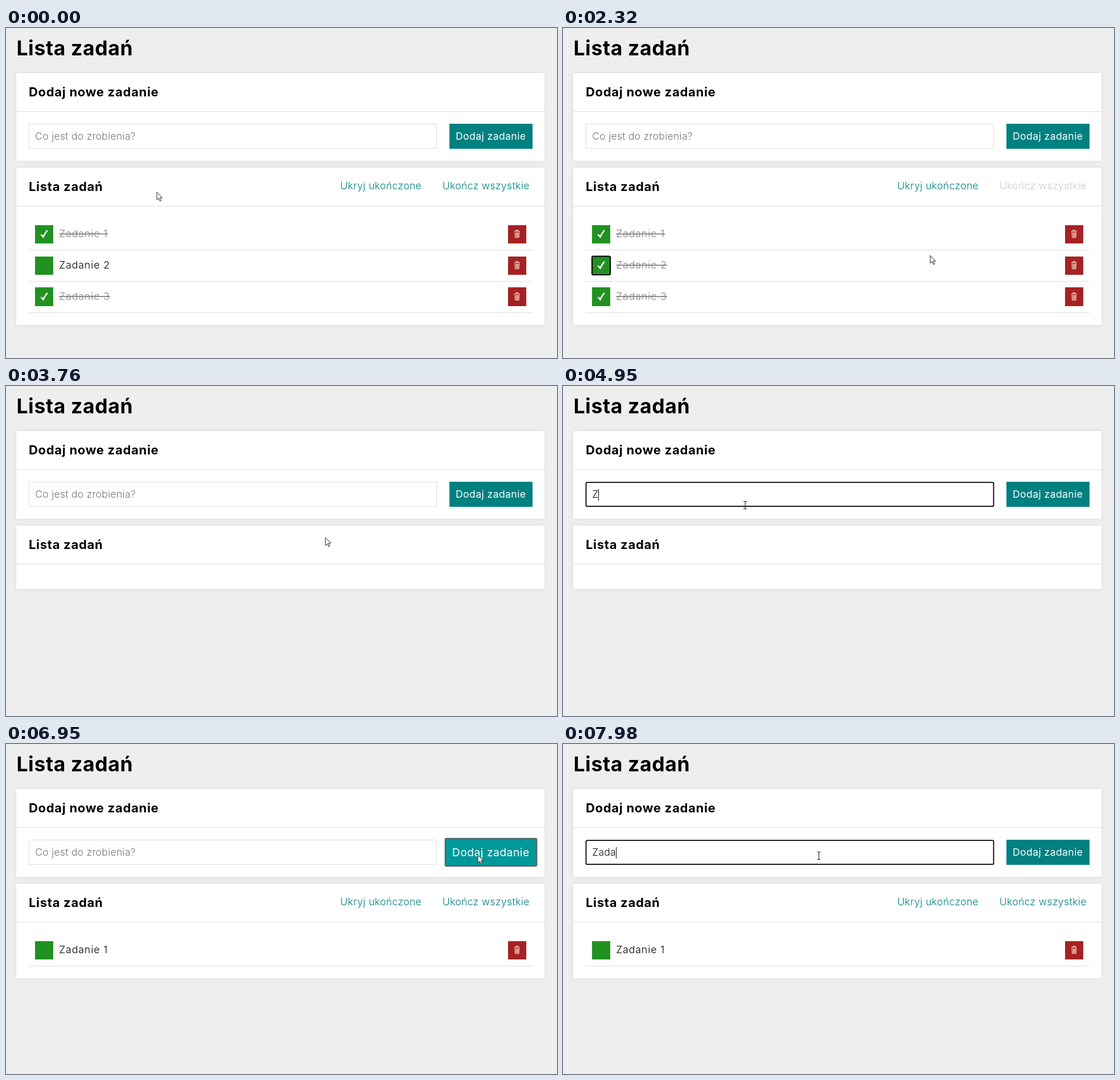
An HTML page for the animation above (8 s loop, 968 px wide and 579 px high).

```html
<!DOCTYPE html>
<html lang="pl">
<head>
<meta charset="utf-8">
<title>Lista zadań</title>
<style>
html, body { margin: 0; width: 100%; height: 100%; overflow: hidden; background: #eee; }
svg { display: block; font-family: Inter, "Open Sans", sans-serif; font-weight: 340; }
text { white-space: pre; }
.h1 { font-size: 35.5px; font-weight: 700; letter-spacing: .65px; }
.h2 { font-size: 22px; font-weight: 700; letter-spacing: .72px; }
.field { font-size: 17.4px; letter-spacing: .33px; }
.button { font-size: 17.5px; font-weight: 400; letter-spacing: .45px; fill: #fff; }
.link { font-size: 17.5px; letter-spacing: .4px; }
.task { font-size: 17.7px; letter-spacing: .9px; }
.card { fill: #fff; filter: drop-shadow(0 0 2.5px #d8d8d8); }
.crisp { shape-rendering: crispEdges; }
.rule { stroke: #ddd; }
</style>
</head>
<body>
<svg id="stage" width="968" height="579" viewBox="0 0 968 579"></svg>
<script>
const LOOP = 8000, FADE = 300, BLINK = 510, ROW = 54.9;
const CHECK_AT = 1070, ADD_AT = 6840;
const REMOVE_AT = [3080, 3270, 3430];
const FOCUS_AT = [4140, 7200];
const KEYS = [
  [4950, ...Array.from({ length: 7 }, (_, i) => 5150 + 90 * i), 5870],
  [7570, 7780, 7880, 7980]
];
const TYPED = "Zadanie 1";

// time, x, y of the pointer
const PATH = [
  [360, 265, 288], [1040, 71, 421], [1620, 71, 421], [2430, 675, 398],
  [2820, 880, 338], [3040, 898, 351], [3450, 898, 351], [4010, 320, 205],
  [4139, 320, 205], [4140, 320, 209], [6350, 320, 209], [6697, 829, 187],
  [6800, 829, 195], [6960, 829, 195], [7160, 449.5, 196]
];

const stage = document.getElementById("stage");

function add(tag, attrs, parent = stage) {
  const node = document.createElementNS("http://www.w3.org/2000/svg", tag);
  set(node, attrs);
  parent.appendChild(node);
  return node;
}
function set(node, attrs) {
  for (const key in attrs) node.setAttribute(key, attrs[key]);
}
function label(x, y, cls, content, parent) {
  const node = add("text", { x, y, class: cls }, parent);
  node.textContent = content;
  return node;
}
function show(node, on) {
  node.style.display = on ? "" : "none";
}
const rule = (x1, x2, y, parent) => add("line", { x1, x2, y1: y, y2: y, class: "rule crisp" }, parent);
const clamp = u => Math.min(1, Math.max(0, u));
const smooth = u => u * u * (3 - 2 * u);
const mix = (a, b, u) => `rgb(${a.map((v, i) => Math.round(v + (b[i] - v) * u))})`;

// CSS "ease" curve
function ease(u) {
  if (u <= 0 || u >= 1) return clamp(u);
  let lo = 0, hi = 1, s = .5;
  for (let i = 0; i < 20; i++) {
    s = (lo + hi) / 2;
    const x = .75 * s * (1 - s) * (1 - s) + .75 * s * s * (1 - s) + s ** 3;
    if (x < u) lo = s; else hi = s;
  }
  return .3 * s * (1 - s) * (1 - s) + 3 * s * s * (1 - s) + s ** 3;
}
const fade = (t, start) => ease((t - start) / FADE);
const hover = (t, enter, leave) => t < leave ? fade(t, enter) : fade(leave, enter) * (1 - fade(t, leave));

add("rect", { width: 968, height: 579, fill: "#eee" });
label(18.4, 48, "h1", "Lista zadań");

add("rect", { x: 18, y: 79, width: 928, height: 154, class: "card" });
label(39.9, 120, "h2", "Dodaj nowe zadanie");
rule(18, 946, 146.5);
const field = add("rect", { x: 40.5, width: 716, fill: "#fff" });
const entry = label(51.3, 196, "field", "");
const caret = add("line", { y1: 181, y2: 201, stroke: "#000" });
const button = add("g", {});
const buttonBox = add("rect", { x: 779, y: 168, width: 146, height: 44 }, button);
label(790, 196, "button", "Dodaj zadanie", button);
const buttonRing = add("rect", {
  x: 779, y: 168, width: 146, height: 44, rx: 2, fill: "none", stroke: "#5a6060", "stroke-width": 1.9
}, button);

const listCard = add("rect", { x: 18, y: 245, width: 928, class: "card" });
label(39.9, 286, "h2", "Lista zadań");
rule(18, 946, 312.5);
const hideLink = label(587.3, 283.4, "link", "Ukryj ukończone");
const doneLink = label(766.7, 283.4, "link", "Ukończ wszystkie");
set(hideLink, { fill: "#008080" });

const rows = [0, 1, 2].map(i => {
  const g = add("g", { transform: `translate(0 ${i * ROW})` });
  const square = x => add("rect", { x, y: 345.6, width: 32.4, height: 32.4, class: "crisp" }, g);
  const box = square(50.7);
  const ring = add("rect", { x: 51, y: 345.6, width: 32, height: 32.4, rx: 2, fill: "none", stroke: "#000", "stroke-width": 2 }, g);
  const tick = add("path", { d: "M61.5 362.2L65.4 366.6Q68.5 360 72.7 355", fill: "none", stroke: "#fff", "stroke-width": 2.5 }, g);
  const name = label(93.2, 367, "task", "", g);
  const bin = square(881.7);
  add("path", {
    d: "M893 356.5h9.6M896 356v-1.4h3.6v1.4M894 357.5l.6 10.2h6.4l.6-10.2M896.4 358.5v8M898 358.5v8M899.6 358.5v8",
    fill: "none", stroke: "#fbeadb", "stroke-width": 1
  }, g);
  rule(40, 925, 389.5, g);
  return { g, box, ring, tick, name, bin };
});

const arrow = add("path", {
  d: "M0 0V13.6L3.2 10.7L5.4 15.8L7.6 14.9L5.4 9.9H9.6Z",
  fill: "#fff", stroke: "#222", "stroke-width": 1
});
const beam = add("path", {
  d: "M-3 -6.5H-1Q0 -6.5 0 -5.5Q0 -6.5 1 -6.5H3M0 -5.5V5.5M-3 6.5H-1Q0 6.5 0 5.5Q0 6.5 1 6.5H3",
  fill: "none", stroke: "#222", "stroke-width": 1.1
});

function tasksAt(t) {
  if (t >= ADD_AT) return [{ id: 1, done: false }];
  const removed = REMOVE_AT.filter(at => t >= at).length;
  return [1, 2, 3].slice(removed).map(id => ({ id, done: id !== 2 || t >= CHECK_AT }));
}

function pointerAt(t) {
  const i = PATH.findIndex(p => p[0] > t);
  if (i === 0) return PATH[0].slice(1);
  if (i < 0) return PATH[PATH.length - 1].slice(1);
  const [t0, x0, y0] = PATH[i - 1], [t1, x1, y1] = PATH[i];
  const u = smooth((t - t0) / (t1 - t0));
  return [x0 + (x1 - x0) * u, y0 + (y1 - y0) * u];
}

function drawRows(t, tasks) {
  const lastRemoval = REMOVE_AT.filter(at => t >= at).pop();
  const binHover = t < 3450 ? fade(t, lastRemoval || 2810) : 0;
  rows.forEach((row, i) => {
    const task = tasks[i];
    show(row.g, task);
    if (!task) return;
    const second = task.id === 2;
    const fresh = second ? fade(t, CHECK_AT) : 1;
    const lit = second && t < REMOVE_AT[0] ? hover(t, 870, 1740) : 0;
    row.name.textContent = "Zadanie " + task.id;
    row.name.style.textDecoration = task.done ? "line-through" : "none";
    set(row.name, { fill: task.done ? mix([0, 0, 0], [128, 128, 128], fresh) : "#000" });
    set(row.box, { fill: mix([33, 145, 33], [37, 166, 37], lit) });
    set(row.tick, { opacity: task.done ? fresh : 0 });
    set(row.bin, { fill: mix([165, 34, 36], [190, 42, 42], i === 0 ? binHover : 0) });
    show(row.ring, second && t >= CHECK_AT && t < REMOVE_AT[0]);
  });
}

function drawField(t) {
  const round = t >= FOCUS_AT[1] ? 1 : 0;
  const focused = t >= FOCUS_AT[round] && !(round === 0 && t >= ADD_AT);
  const pressed = focused ? KEYS[round].filter(at => t >= at) : [];
  const text = TYPED.slice(0, pressed.length);
  set(field, focused
    ? { y: 169.2, height: 42, rx: 2, stroke: "#000", "stroke-width": 1.8 }
    : { y: 168.5, height: 43, rx: 0, stroke: "#ddd", "stroke-width": 1 });
  entry.textContent = text || "Co jest do zrobienia?";
  set(entry, { fill: text ? "#111" : "#757575" });
  const since = t - (pressed.length ? pressed[pressed.length - 1] : FOCUS_AT[round]);
  show(caret, focused && Math.floor(since / BLINK) % 2 === 0);
  const x = Math.max(52.5, Math.floor(51.8 + (text ? entry.getComputedTextLength() : 0)) + .5);
  set(caret, { x1: x, x2: x });
}

function drawButton(t) {
  const h = hover(t, 6622, 7020);
  const s = 1 + .1 * h;
  set(button, { transform: `translate(852 190) scale(${s}) translate(-852 -190)` });
  set(buttonBox, { fill: mix([0, 128, 128], [0, 153, 153], h) });
  set(buttonRing, { opacity: t < FOCUS_AT[1] ? clamp((t - ADD_AT) / 100) : 0 });
}

function draw(t) {
  const tasks = tasksAt(t);
  set(listCard, { height: 111 + Math.round(ROW * tasks.length) });
  show(hideLink, tasks.length);
  show(doneLink, tasks.length);
  set(doneLink, { fill: mix([0, 128, 128], [204, 204, 204], t < ADD_AT ? fade(t, CHECK_AT) : 0) });
  drawRows(t, tasks);
  drawField(t);
  drawButton(t);

  const [x, y] = pointerAt(t);
  const inField = t >= FOCUS_AT[0] && x < 757;
  show(arrow, !inField);
  show(beam, inField);
  set(inField ? beam : arrow, { transform: `translate(${x} ${y})` });
}

function tick(now) {
  draw(now % LOOP);
  requestAnimationFrame(tick);
}
draw(0);
requestAnimationFrame(tick);
</script>
</body>
</html>
```
